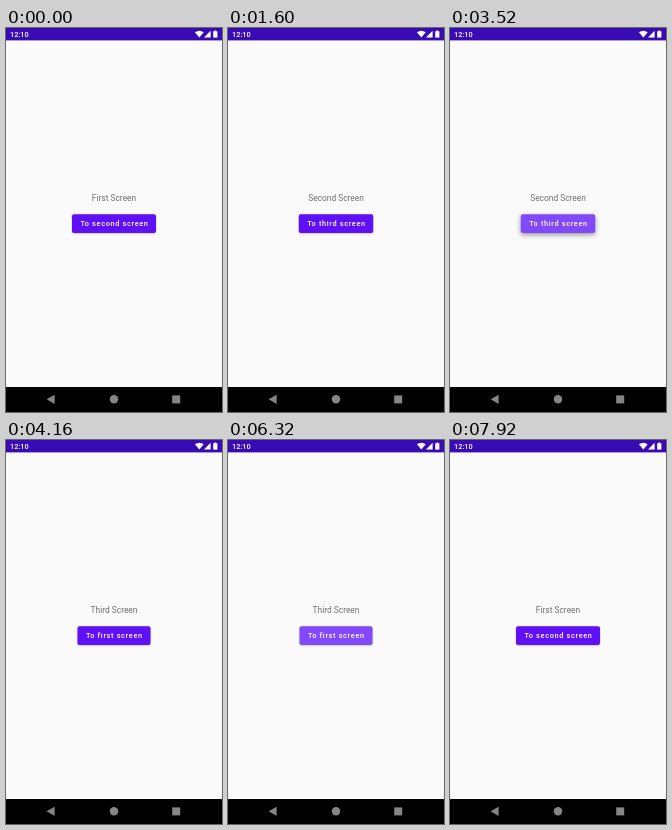
Animation of 216x384 px, one loop 8000 ms. Source, as an HTML page with a canvas:

```html
<!DOCTYPE html>
<html lang="en">
<head>
<meta charset="utf-8">
<title>Three screens</title>
<style>
html, body { margin: 0; width: 100%; height: 100%; overflow: hidden; background: #fafafa; }
canvas { display: block; width: 216px; height: 384px; }
</style>
</head>
<body>
<canvas id="stage" width="216" height="384"></canvas>
<script>
const ctx = document.getElementById('stage').getContext('2d');
const LOOP = 8000;
const FONT = 'Roboto, sans-serif';

const SCREENS = [
  { title: 'First Screen', action: 'To second screen', width: 84 },
  { title: 'Second Screen', action: 'To third screen', width: 74.4 },
  { title: 'Third Screen', action: 'To first screen', width: 73 }
];

// Each state holds until the next start time.
const TIMELINE = [
  { at: 0, screen: 0, press: 'none' },
  { at: 960, screen: 0, press: 'ripple' },
  { at: 1280, screen: 0, press: 'lit', raised: true },
  { at: 1600, screen: 1, press: 'none' },
  { at: 3200, screen: 1, press: 'ripple' },
  { at: 3520, screen: 1, press: 'lit', raised: true },
  { at: 3840, screen: 2, press: 'none' },
  { at: 6000, screen: 2, press: 'ripple' },
  { at: 6320, screen: 2, press: 'lit' },
  { at: 6640, screen: 0, press: 'none' }
];

const BUTTON_COLORS = { none: '#5f10f4', ripple: '#530ee6', lit: '#8249fb' };

function rect(x, y, w, h, color) {
  ctx.fillStyle = color;
  ctx.fillRect(x, y, w, h);
}

function polygon(points, color) {
  ctx.fillStyle = color;
  ctx.beginPath();
  points.forEach(([x, y]) => ctx.lineTo(x, y));
  ctx.fill();
}

function disc(x, y, r, color) {
  ctx.fillStyle = color;
  ctx.beginPath();
  ctx.arc(x, y, r, 0, Math.PI * 2);
  ctx.fill();
}

function text(value, x, y, { size, weight = 400, color, align = 'left', spacing = 0 }) {
  ctx.font = `${weight} ${size}px ${FONT}`;
  ctx.letterSpacing = `${spacing}px`;
  ctx.textAlign = align;
  ctx.fillStyle = color;
  ctx.fillText(value, x, y);
}

function drawStatusBar() {
  rect(0, 0, 216, 12.4, '#390bb4');
  text('12:10', 4, 9.1, { size: 7.4, weight: 500, color: '#fff' });

  ctx.fillStyle = '#fff';
  ctx.beginPath();
  ctx.moveTo(193.3, 9.6);
  ctx.lineTo(188.9, 4.3);
  ctx.quadraticCurveTo(193.3, 1.3, 197.7, 4.3);
  ctx.fill();

  polygon([[198, 9.4], [204.6, 9.4], [204.6, 2.8]], '#fff');
  rect(207.2, 3.2, 4.2, 6.4, '#fff');
  rect(208.5, 2.5, 1.6, 1, '#fff');
}

function drawNavigation() {
  const gray = '#858585';
  rect(0, 359, 216, 25, '#000');
  polygon([[40.6, 371.3], [48.6, 366.7], [48.6, 375.9]], gray);
  disc(108, 371.3, 4.2, gray);
  rect(166.2, 367.4, 8, 8, gray);
}

function drawButton({ action, width }, press, raised) {
  const left = 108 - width / 2, top = 186.2, height = 18.8;
  const shape = new Path2D();
  shape.roundRect(left, top, width, height, 2.1);

  ctx.save();
  ctx.shadowColor = raised ? 'rgba(0,0,0,.42)' : 'rgba(0,0,0,.28)';
  ctx.shadowBlur = raised ? 5 : 2;
  ctx.shadowOffsetY = raised ? 1.8 : 0.6;
  ctx.fillStyle = BUTTON_COLORS[press];
  ctx.fill(shape);
  ctx.restore();

  if (press === 'ripple') {
    ctx.save();
    ctx.clip(shape);
    disc(115, 195.6, 28, '#6a2ef0');
    ctx.restore();
  }
  text(action, left + 8.4, 198.4, { size: 7.35, weight: 500, color: '#fff', spacing: 0.656 });
}

function draw(time) {
  const state = TIMELINE.findLast(entry => entry.at <= time);
  const screen = SCREENS[state.screen];
  rect(0, 0, 216, 384, '#fafafa');
  drawStatusBar();
  text(screen.title, 108, 172.6, { size: 8.4, color: '#707070', align: 'center' });
  drawButton(screen, state.press, state.raised);
  drawNavigation();
}

const start = performance.now();
function tick() {
  draw((performance.now() - start) % LOOP);
  requestAnimationFrame(tick);
}
tick();
</script>
</body>
</html>
```
